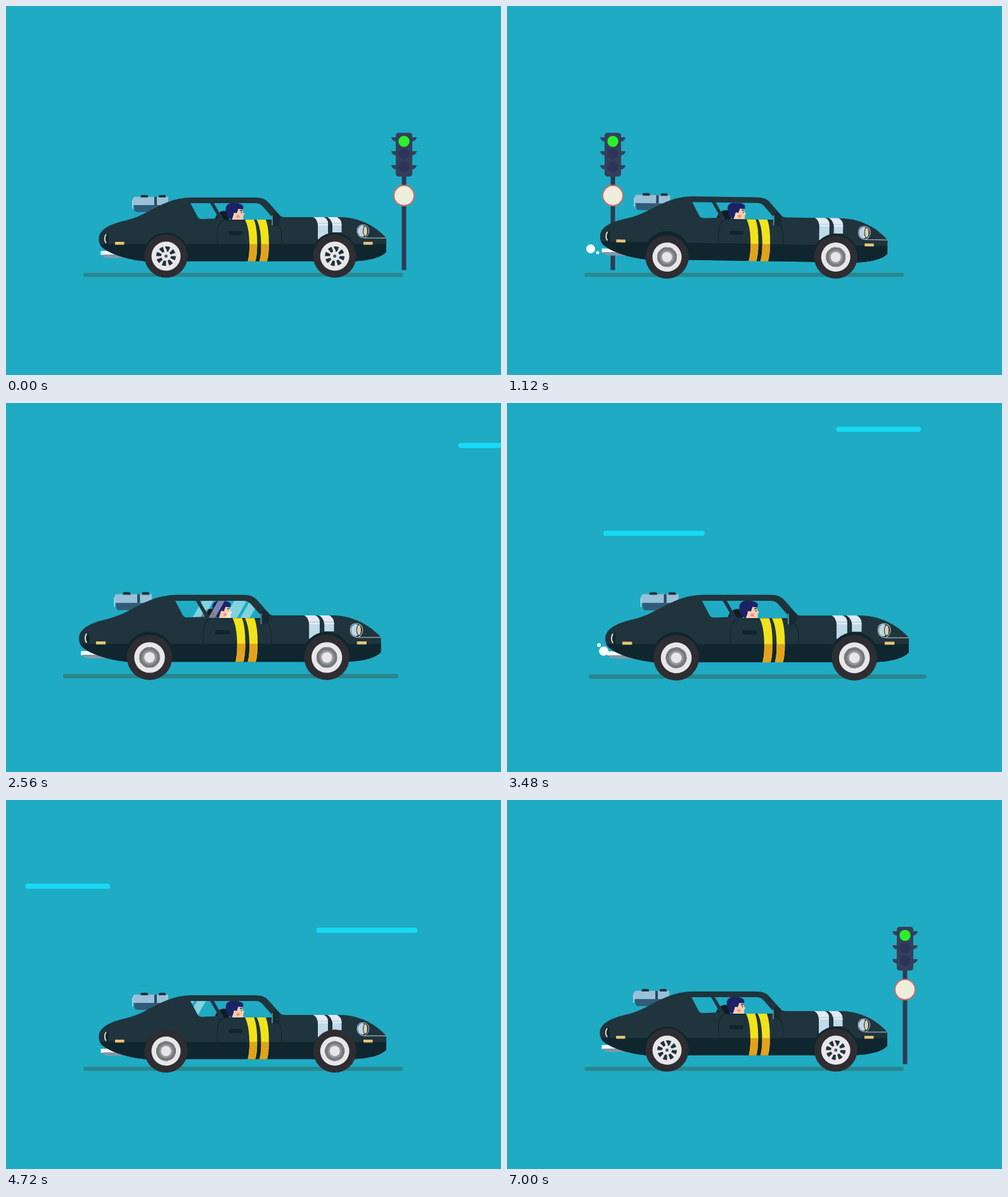
Animation, 781 px wide and 582 px high, one loop 7920 ms. Source, as an HTML page:

```html
<!DOCTYPE html>
<html lang="en">
<head>
<meta charset="utf-8">
<title>Car at the lights</title>
<style>
  html, body { margin: 0; width: 100%; height: 100%; overflow: hidden; background: #1fabc3; }
  svg { display: block; width: 100%; height: 100%; }
</style>
</head>
<body>
<svg viewBox="0 0 781 582">
  <defs>
    <path id="windows" d="M291 311H322L336 335L309 336Q304 336 302 332Z
      M328 311H393Q400 311 404 315L419 332V337H343Z"/>
    <path id="shell" d="M146.5 367C147 351 167 343 190 338C225 330 247 303 292 302H393C404 302 410 305 415 311
      L431 329Q434 333 440 333H530C560 334 585 349 600 366V388C590 398 570 402 545 402.500H218
      C185 399 161 389 151 380Q146 374 146.500 367Z"/>
    <path id="stripe" d="M377 337H391.500Q396.500 351 396.300 375Q396.300 393 393.500 402.500H381.500Q384.500 391 384 375Q383.500 349 377 337Z"/>
    <clipPath id="glass"><use href="#windows"/></clipPath>
    <clipPath id="low"><rect x="140" y="375.500" width="470" height="40"/></clipPath>
    <clipPath id="shellClip"><use href="#shell"/></clipPath>
    <path id="visors" fill="#353f5a" d="M616 207H608Q609 213 616 214ZM640 207H648Q647 213 640 214Z"/>
    <g id="wheel">
      <circle r="34" fill="#2e2d32"/>
      <circle r="23" fill="#e9e6ea"/>
      <g class="rim">
        <circle r="11.500" fill="none" stroke="#1f3139" stroke-width="8" pathLength="8" stroke-dasharray=".58 .42"/>
        <circle r="2.500" fill="#4b555b"/>
      </g>
      <g class="blur">
        <circle r="15.500" fill="#77797b"/>
        <circle r="11" fill="#96979a"/>
        <circle r="8" fill="#e9e6ea"/>
      </g>
    </g>
  </defs>

  <rect width="781" height="582" fill="#1fabc3"/>
  <g id="streaks" stroke="#17daf5" stroke-width="8" stroke-linecap="round"></g>

  <g id="signal">
    <rect x="624.500" y="262" width="7" height="154.500" fill="#2f3a55"/>
    <use href="#visors"/><use href="#visors" y="22"/><use href="#visors" y="44"/>
    <rect x="615" y="200" width="26" height="69" rx="4.500" fill="#353f5a"/>
    <g fill="#2d3459">
      <circle id="lamp" cx="628" cy="213.500" r="8.700"/>
      <circle cx="628" cy="233.500" r="8.500"/>
      <circle cx="628" cy="254" r="8.500"/>
    </g>
    <circle cx="628" cy="299" r="16" fill="#eeeedd" stroke="#d2696c" stroke-width="2"/>
  </g>

  <g id="car">
    <path d="M125.500 424H623" stroke="#29878f" stroke-width="6.500" stroke-linecap="round"/>
    <g id="body">
      <path d="M149.500 386.500H185V392.500H149.500Z" fill="#fff"/>
      <path d="M152 392H200V397.500H160Q153 396.500 152 392Z" fill="#7c9aab"/>
      <path d="M202 312H250V325H207Q202 325 202 318Z" fill="#2f5d79"/>
      <path d="M202 301H256V314H200Q198 306 202 301Z" fill="#98c0d8"/>
      <path d="M199.800 306V320" stroke="#b7d5e4" stroke-width="1.500"/>
      <path d="M234 301H238V314H234Z" fill="#28495c"/>
      <path d="M212.500 302V299.500Q212.500 298 214 298H222Q224 298 224 300V302ZM241 302V299.500Q241 298 243 298H250Q252 298 252 300V302Z" fill="#1f343e"/>

      <g clip-path="url(#glass)">
        <path d="M329 338Q332 324 344 323Q352 323 352 338Z" fill="#101c22"/>
        <path d="M356 338L357 326Q364 316 373.500 318V325L376.300 328.500L374.300 330.500V338Z" fill="#f8cfae"/>
        <path d="M350 333Q345 322 347.500 316Q351 310 361 310.500Q370 311 374 315Q375 318 373.500 321L366.500 320L364 327H360L356 338Z" fill="#1b2267"/>
        <circle cx="361.500" cy="328.500" r="2.400" fill="#f8cfae"/>
        <circle cx="366" cy="332" r="2.600" fill="#f68e86"/>
        <path d="M369 323L373 322.500M371.500 325V327" stroke="#1b2267" stroke-width="1.300"/>
        <g id="shine" fill="#fff" opacity=".45"></g>
      </g>

      <path fill="#20343d" fill-rule="evenodd" id="panel"/>
      <use href="#shell" fill="#0f262f" clip-path="url(#low)"/>
      <path d="M333.500 376V356Q334 341 344 338H420Q434 344 435 360V376" fill="none" stroke="#142a33" stroke-width="1.500"/>
      <rect x="351" y="355" width="22" height="6.500" rx="3" fill="#10262f"/>

      <g fill="#f1e31b"><use href="#stripe"/><use href="#stripe" x="18.500"/></g>
      <g fill="#e2a21d" clip-path="url(#low)"><use href="#stripe"/><use href="#stripe" x="18.500"/></g>

      <path d="M485 333H501Q508 336 508 343V368H492V345Q491 336 485 333ZM507 333H522Q529.500 337 529.500 344V357H515V345Q513 336 507 333Z" fill="#c1dae8"/>
      <path d="M485 333H501Q507 335 508 342H491.500Q490 335 485 333ZM507 333H522Q528 336 529 342H514.500Q512 335 507 333Z" fill="#e3e9f4"/>
      <path d="M492 345H508M515 345H529.500" stroke="#f2f6fa" stroke-width="1.500"/>

      <g fill="#0f262f" clip-path="url(#shellClip)">
        <circle cx="252.500" cy="394" r="36.500"/><circle cx="518.500" cy="394" r="36.500"/>
      </g>

      <ellipse cx="562" cy="355" rx="7" ry="9" fill="#bdd6e8"/>
      <ellipse cx="567" cy="355" rx="4" ry="8.500" fill="#15272f"/>
      <ellipse cx="567" cy="355" rx="3" ry="7.500" fill="#d6cfa9"/>
      <path d="M567 346Q573 348 572.500 356Q571 363 566 365.500M567 345.500Q554 343 554 355Q554 365 566 366H600" fill="none" stroke="#c3d2d8" stroke-width="1"/>
      <path d="M564 372H578.500V376.500H564ZM172 372H186.500V376.500H172Z" fill="#eac474"/>
      <path d="M162 359H157Q151 367 157 375H162Z" fill="#12272f"/>
      <path d="M158 360Q153.500 367 158 374" fill="none" stroke="#dfd9cd" stroke-width="2"/>

      <path d="M420 329L424 325Q432 327 432 333V342Q430 347 421 347Z" fill="#172b34"/>
      <path d="M420 330V346" stroke="#58808e" stroke-width="2"/>
    </g>
    <g id="wheels">
      <use href="#wheel" x="252.500" y="394.500"/>
      <use href="#wheel" x="518.700" y="394.500"/>
    </g>
    <g id="puffs" fill="#fff"></g>
  </g>
</svg>

<script>
const LOOP = 7920, STEP = 40;
const $ = id => document.getElementById(id);
const set = (el, attrs) => { for (const k in attrs) el.setAttribute(k, attrs[k]); };
const clamp = v => Math.min(1, Math.max(0, v));

function make(parent, tag, attrs) {
  const el = document.createElementNS('http://www.w3.org/2000/svg', tag);
  set(el, attrs);
  return parent.appendChild(el);
}

// Smoothly blended value between [time, value] keys
function track(t, keys) {
  let i = 0;
  while (i < keys.length - 1 && t >= keys[i + 1][0]) i++;
  const [t0, a] = keys[i], [t1, b] = keys[i + 1] || [t0 + 1, a];
  const p = clamp((t - t0) / (t1 - t0));
  return a + (b - a) * p * p * (3 - 2 * p);
}

const shift = [[2400, 0], [2720, -38], [3640, 27.5], [4240, 0]];
const zoom = [[2380, 1], [2680, 1.078], [3200, 1.078], [4000, 1]];
const tilt = [[0, 0], [320, -1.2], [1120, .9], [1520, 0], [5200, 0], [5680, 1.5], [5760, 1.5], [6120, -.3], [6340, 0]];
const sink = [[0, 0], [1120, -.5], [1600, 0], [4400, 0], [4700, 6], [5760, 6], [6200, 0]];
const drop = [[0, 0], [400, 1.5], [4700, 1.5], [5720, 2.5], [6240, 0]];
const blurred = [[80, 0], [560, 1], [5440, 1], [6100, 0]];

// Road distance measured from the stop line
const road = t => t < 3000
  ? 461 * (t / 1120) ** 2
  : -26 * (Math.max(0, 6185 - t) / 585) ** 4;

const STREAK_SPEED = 1.35;
const streaks = [
  { y: 67, len: 134, starts: [1130, 2510, 4000] },
  { y: 136, len: 134, starts: [1184, 2674, 4164] },
  { y: 205.5, len: 160, starts: [1524, 3014, 4504] },
  { y: 41.5, len: 134, starts: [1796, 3286, 4800] },
].map(s => ({ ...s, el: make($('streaks'), 'line', { y1: s.y, y2: s.y }) }));

// Exhaust puffs: launch time, x offset, y, radius, life, speed
const puffs = [[100, 0, 384, 7, 680, .215], [180, 4, 390, 3, 480, .2]];
for (let t = 459; t < 5700; t += 541) {
  puffs.push([t, 0, 383, 7, 180, .15], [t, 11, 389, 2.5, 180, .15]);
  puffs.push([t + 271, 0, 386, 7, 200, .13], [t + 271, -7, 377, 2.8, 200, .13]);
}
const puffEls = puffs.map(() => make($('puffs'), 'circle', {}));

for (const [x, w] of [[-14, 14], [-38, 19], [-62, 10], [-86, 17]])
  make($('shine'), 'path', { d: `M${x - 8} 338h${w}l16 -28h${-w}z` });

set($('panel'), { d: $('shell').getAttribute('d') + $('windows').getAttribute('d') });

function draw(t) {
  const gone = road(t);
  set($('signal'), { transform: `translate(${-gone})` });
  set($('lamp'), { fill: t < 3000 || t >= 7000 ? '#2bf02b' : '#c64444' });

  for (const { starts, len, el } of streaks) {
    const start = starts.filter(s => s <= t).pop() ?? Infinity;
    const x = t < start ? 900 : 781 - (t - start) * STREAK_SPEED;
    set(el, { x1: x + 4, x2: x + len - 4 });
  }

  set($('car'), { transform:
    `translate(${390.5 + track(t, shift)} 291) scale(${track(t, zoom)}) translate(-390.5 -291)` });
  set($('body'), { transform: `translate(0 ${track(t, sink)}) rotate(${track(t, tilt)} 375 395)` });
  set($('wheels'), { transform: `translate(0 ${track(t, drop)})` });

  set(document.querySelector('.rim'), { transform: `rotate(${gone / 34 * 180 / Math.PI % 360})` });
  set(document.querySelector('.blur'), { opacity: track(t, blurred) });

  // Reflections sweep backwards over the glass twice
  const sweep = t < 3600 ? t - 2560 : t - 4520;
  set($('shine'), { transform: `translate(${410 - sweep * .51})`, visibility: Math.abs(sweep) < 500 ? 'visible' : 'hidden' });

  puffs.forEach(([start, dx, y, r, life, speed], i) => {
    const age = t - start;
    const size = clamp(age / 45) * clamp((life - age) / 50);
    set(puffEls[i], { cx: 150 + dx - age * speed, cy: y, r: r * size });
  });
}

const begin = performance.now();
function frame() {
  const t = (performance.now() - begin) % LOOP;
  draw(Math.floor(t / STEP) * STEP);
  requestAnimationFrame(frame);
}
frame();
</script>
</body>
</html>
```
